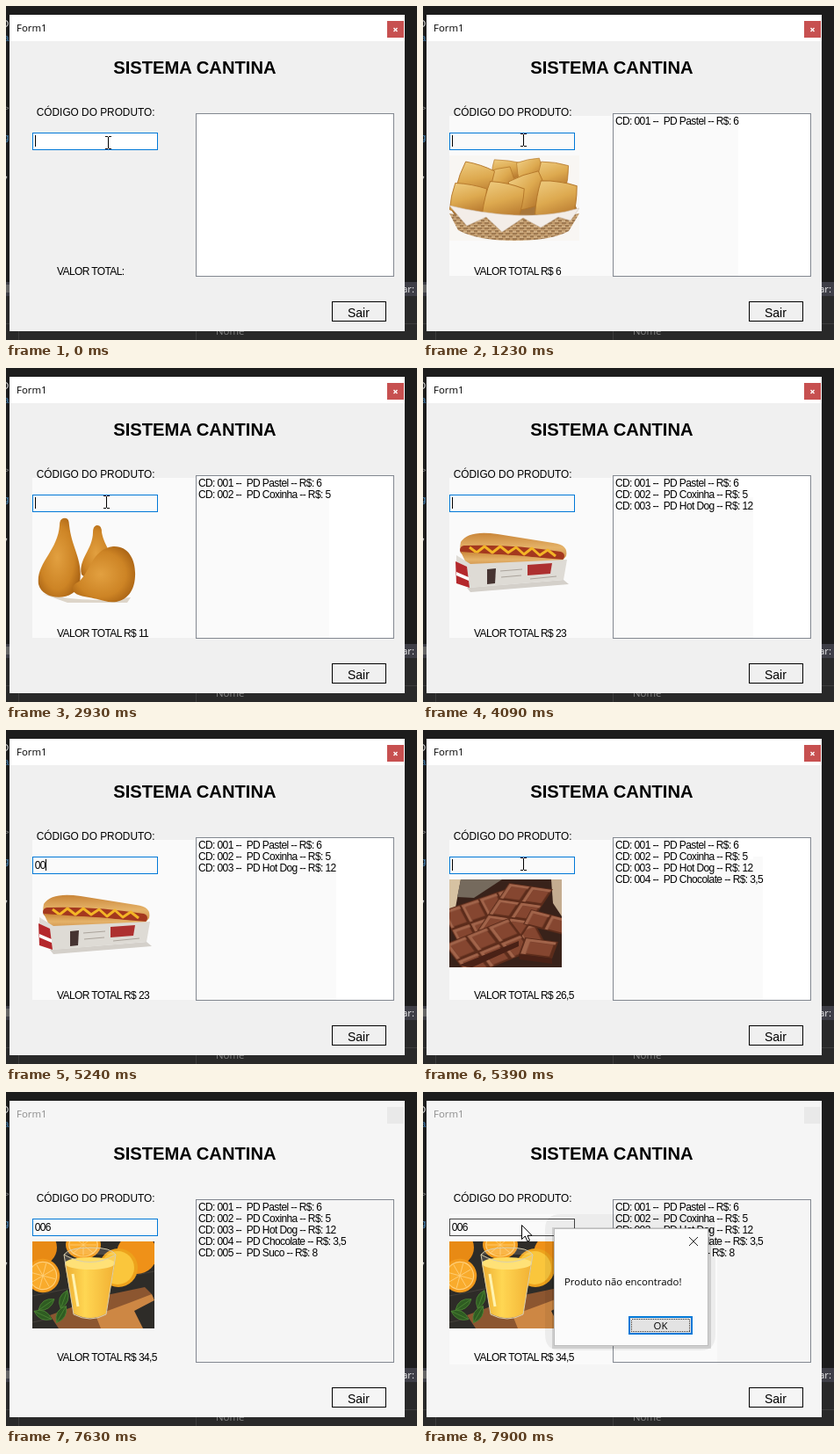
Recreate the animation shown at these times as an HTML page. Size 468 by 380 pixels, loop 8 s.

```html
<!DOCTYPE html>
<html lang="pt">
<head>
<meta charset="utf-8">
<title>Sistema Cantina</title>
<style>
  html, body { margin: 0; width: 100%; height: 100%; overflow: hidden; background: #1c1c1c; }
  #stage { display: block; --face: #f0f0f0; --paper: #fff; --title: #000; --close: #c75050; }
  #stage.inactive { --face: #f5f5f5; --paper: #f5f5f5; --title: #8c8c8c; --close: #e9e9e9; }
  text { white-space: pre; font-family: "Liberation Sans", Arial, sans-serif; }
  .face { fill: var(--face); }
  .paper { fill: var(--paper); }
  .ui { font: 11.4px "Open Sans", "Noto Sans", sans-serif; }
  .small { font-size: 12px; letter-spacing: -.61px; }
  .crisp { shape-rendering: crispEdges; }
  .off { display: none; }
</style>
</head>
<body>
<svg id="stage" width="468" height="380" viewBox="0 0 468 380">
  <defs>
    <linearGradient id="crust" x2=".6" y2="1">
      <stop stop-color="#efcd82"/><stop offset=".55" stop-color="#dda94f"/><stop offset="1" stop-color="#b87a30"/>
    </linearGradient>
    <radialGradient id="fried" cx=".45" cy=".5" r=".62">
      <stop stop-color="#e2a040"/><stop offset=".65" stop-color="#cd8425"/><stop offset="1" stop-color="#a55f12"/>
    </radialGradient>
    <linearGradient id="bread" x2="0" y2="1">
      <stop stop-color="#c98538"/><stop offset=".5" stop-color="#e5b36a"/><stop offset="1" stop-color="#c98a45"/>
    </linearGradient>
    <linearGradient id="juice">
      <stop stop-color="#e9a012"/><stop offset=".4" stop-color="#ffd038"/><stop offset="1" stop-color="#efa414"/>
    </linearGradient>
    <pattern id="wicker" width="8" height="6" patternUnits="userSpaceOnUse">
      <path fill="#bf986a" d="M0 0H8V6H0z"/><path stroke="#7d5a38" d="M0 5H5M4 2H8"/><path stroke="#dfc49c" d="M0 3H4M4 0H8"/>
    </pattern>
    <pattern id="cocoa" width="20" height="20" patternUnits="userSpaceOnUse">
      <path fill="#5c2c1b" d="M0 0H20V20H0z"/><path fill="#a2644a" d="M1 1H19V4H4V19H1z"/><path fill="#854630" d="M4 4H18V18H4z"/>
    </pattern>
    <path id="pillow" fill="url(#crust)" stroke="#b4772a" stroke-width=".8" d="M-17-15Q0-18 16-16Q19 0 17 16Q0 19-17 16Q-19 0-17-15z"/>
    <g id="slice">
      <circle r="16" fill="#f29a1c"/><circle r="13.5" fill="#ffd07a"/><circle r="12.5" fill="#f9ab2c"/>
      <path stroke="#ffcf78" stroke-width=".7" d="M-12 0H12M0-12V12M-8.5-8.5 8.5 8.5M8.5-8.5-8.5 8.5"/>
    </g>
    <path id="leaf" fill="#2f5c22" stroke="#4c8434" stroke-width=".8" d="M-11 0Q0-10 11 0Q0 9-11 0zH11"/>
  </defs>

  <!-- editor behind the window -->
  <path fill="#1c1c1c" d="M0 0H468V380H0z"/>
  <g class="ui">
    <text x="-5" y="24" fill="#ddd">D</text>
    <text x="-3" y="40" fill="#3f7cae">a</text>
    <text x="-3" y="120" fill="#777">&gt;</text>
    <text x="-3" y="153" fill="#4b8fc4">g</text>
    <text x="-1" y="195" fill="#eee">,</text>
  </g>
  <path fill="#292929" d="M0 330H468V380H0z"/>
  <path fill="#3e3e46" d="M0 314H468V330H0z"/>
  <path fill="#666" d="M0 317H4V326H0z"/>
  <path class="crisp" stroke="#3d3d3d" d="M0 361.5H468M14.5 362V380M216.5 362V380"/>
  <text class="ui" x="451" y="326" fill="#eee">ar:</text>
  <text class="ui" x="239" y="374" fill="#858585">Nome</text>

  <!-- window -->
  <path class="face" d="M4 10H454V370H4z"/>
  <path class="paper" d="M4 10H454V40H4z"/>
  <text class="ui" x="12" y="29" fill="var(--title)">Form1</text>
  <path fill="var(--close)" d="M434 17H453V36H434z"/>
  <path id="closeMark" stroke="#fff" stroke-width="1.4" d="M441.5 25 445.5 29M445.5 25 441.5 29"/>
  <path class="paper" d="M216 122H442V308H216z"/>
  <path id="patch" fill="#fafafa"/>
  <path class="crisp" fill="none" stroke="#828790" d="M216.5 122.5H441.5V307.5H216.5z"/>
  <text x="122.2" y="77" font-size="20.2" font-weight="bold">SISTEMA CANTINA</text>
  <text x="34.8" y="125" font-size="11.85">CÓDIGO DO PRODUTO:</text>
  <text id="total" class="small" x="58" y="306"></text>
  <path class="crisp" fill="none" stroke="#000" d="M371.5 336.5H432.5V358.5H371.5z"/>
  <text x="389" y="354" font-size="14">Sair</text>
  <g id="rows"></g>

  <!-- product pictures -->
  <svg class="photo off" x="30" y="170" width="148" height="97">
    <path fill="#f8f6f3" d="M0 0H148V97H0z"/>
    <path fill="#a8763a" d="M2 62Q20 22 74 20Q130 22 146 62L132 80H14z"/>
    <use href="#pillow" transform="translate(66 16) rotate(8) scale(.95 .6)"/>
    <use href="#pillow" transform="translate(92 18) rotate(-10) scale(.8)"/>
    <use href="#pillow" transform="translate(118 24) rotate(10) scale(.95)"/>
    <use href="#pillow" transform="translate(58 30) rotate(-12) scale(.9)"/>
    <use href="#pillow" transform="translate(30 28) rotate(20) scale(1.05)"/>
    <use href="#pillow" transform="translate(22 50) rotate(12) scale(1.1 1)"/>
    <use href="#pillow" transform="translate(90 40) rotate(-18) scale(1.1)"/>
    <use href="#pillow" transform="translate(62 52) rotate(14) scale(1.2)"/>
    <use href="#pillow" transform="translate(122 51) rotate(10) scale(1.25)"/>
    <path fill="url(#wicker)" d="M0 66Q74 80 148 66L136 86Q116 97 74 97Q32 97 10 85z"/>
    <path fill="#f3ede8" stroke="#d5c8bd" stroke-width=".6" d="M0 57Q36 66 74 68Q116 70 148 60L138 74 124 70 104 82 84 71 60 87 42 70 20 80z"/>
  </svg>
  <svg class="photo off" x="30" y="170" width="118" height="97">
    <path fill="#fafafa" d="M0 0H118V97H0z"/>
    <path fill="#ddd5c9" d="M12 87Q60 98 112 91L108 97H40z"/>
    <g fill="url(#fried)">
      <path d="M73 9Q79 8 79 17C82 34 94 42 93 62Q75 82 56 65C52 48 69 36 69 17Q69 10 73 9z"/>
      <path d="M35 1Q42-1 42 9C45 36 58 48 54 74C50 96 12 96 7 76C4 52 29 38 31 9Q31 2 35 1z"/>
      <path d="M46 82Q45 77 53 73C66 62 68 36 92 33C110 32 118 49 117 67C116 91 99 100 82 95C67 90 48 91 46 82z"/>
    </g>
  </svg>
  <svg class="photo off" x="30" y="170" width="140" height="90">
    <path fill="#d4d0ca" d="M20 80 130 71 136 76 24 85z"/>
    <path fill="url(#bread)" d="M13 28Q22 14 55 19L118 29Q136 31 133 44L127 51 18 46Q10 38 13 28z"/>
    <path fill="none" stroke="#a4381e" stroke-width="10" stroke-linecap="round" d="M17 37Q70 35 126 44"/>
    <path fill="none" stroke="#f3b526" stroke-width="3" stroke-linejoin="round" d="M23 34 31 40 40 33 49 40 58 33 67 40 76 34 85 42 94 35 103 43 112 37 121 44"/>
    <path fill="url(#bread)" d="M13 39Q70 43 130 48L126 57 20 54z"/>
    <path fill="#dedbd5" d="M8 43 24 53 134 48 130 71 23 80 8 74z"/>
    <path fill="#b4282c" d="M7 50 20 56 23 80 8 75z"/>
    <path fill="#fff" d="M8 62 22 68V72L8 66z"/>
    <path fill="#463432" d="M43 59 53 58 52 75 43 76z"/>
    <path fill="#ad3030" d="M89 54 117 52 115 64 89 66z"/>
    <path fill="none" stroke="#aaa39b" d="M58 61 83 59M59 68 82 66M92 70 122 67"/>
  </svg>
  <svg class="photo off" x="30" y="170" width="128" height="100">
    <path fill="#39221a" d="M0 0H128V100H0z"/>
    <path fill="#d6c2a2" d="M0 0H13L7 32 0 36z"/>
    <path fill="#756a5d" d="M13 0H60L28 21 9 20z"/>
    <path fill="#c4ac90" d="M116 0H128V42L118 27z"/>
    <g fill="url(#cocoa)">
      <path transform="matrix(1.05 -.36 .55 1.05 -9 36)" d="M0 0H80V60H0z"/>
      <path transform="matrix(1.25 .18 -.6 .9 68 4)" d="M0 0H40V60H0z"/>
      <path transform="matrix(1.22 -.5 .7 .92 -6 74)" d="M0 0H60V40H0z"/>
      <path transform="matrix(1.15 .3 -.45 .85 93 34)" d="M0 0H40V20H0z"/>
      <path transform="matrix(1.9 .25 -.35 .95 86 66)" d="M0 0H20V20H0z"/>
    </g>
    <path fill="#4a2116" d="M79 85 117 90V96L80 91zM10 98 79 70V76L26 100z"/>
  </svg>
  <svg class="photo off" x="30" y="170" width="139" height="99">
    <path fill="#2e2c28" d="M0 0H139V99H0z"/>
    <path stroke="#45403a" d="M0 62 139 34M0 92 139 64"/>
    <circle cx="8" cy="7" r="20" fill="#e88a14"/>
    <use href="#slice" transform="translate(58 4) scale(1.25 1)"/>
    <circle cx="119" cy="14" r="23" fill="#ef9118"/>
    <use href="#slice" transform="translate(12 39) rotate(15) scale(1.2)"/>
    <path fill="#8c5630" d="M20 84 80 62 128 52 136 60 114 76 124 99H30z"/>
    <path fill="#cd8744" d="M72 84 110 70 136 60 139 67 116 79 126 99H78z"/>
    <circle cx="98" cy="30" r="22" fill="#eda21c"/>
    <circle cx="97" cy="30" r="19" fill="#fac63c"/>
    <path fill="url(#juice)" d="M37 26Q66 34 94 25L84 82Q66 92 47 82z"/>
    <ellipse cx="65.5" cy="25" rx="28.5" ry="7" fill="#ffdc62"/>
    <path fill="#ffffff22" stroke="#d9cfae" d="M36 15Q66 32 95 15L84 83Q66 93 47 83zQ42 7 66 7T95 15"/>
    <path stroke="#fff3b0" stroke-width="3" d="M46 37 52 74"/>
    <use href="#leaf" transform="translate(36 66) rotate(-70)"/>
    <use href="#leaf" transform="translate(16 72) rotate(-35)"/>
    <use href="#leaf" transform="translate(12 84) rotate(25)"/>
    <use href="#leaf" transform="translate(33 83) rotate(-60)"/>
  </svg>

  <!-- code field -->
  <path id="field" class="crisp" stroke="#0078d7" d="M30.5 144.5H172.5V163.5H30.5z"/>
  <text id="code" class="small" x="32.7" y="158"></text>
  <path id="caret" class="crisp" d="M0 147H1V160H0z"/>
  <path id="beam" class="crisp" fill="none" stroke="#000" d="M-3 .5H0M1 .5H4M.5 1V14M-3 14.5H0M1 14.5H4"/>

  <!-- message box -->
  <g id="dialog" class="off">
    <path id="shadow" fill="#000" opacity=".055" d="M157 139H316Q333 139 333 156V276Q333 294 316 294H157Q139 294 139 276V156Q139 139 157 139z"/>
    <g id="box">
      <path fill="#000" opacity=".13" d="M147 154H328V292H147z"/>
      <path class="crisp" fill="#fbfbfb" stroke="#bdbdbd" d="M149.5 155.5H324.5V288.5H149.5z"/>
      <path stroke="#222" d="M303 165 313 175M313 165 303 175"/>
      <text class="ui" x="161" y="220">Produto não encontrado!</text>
      <path class="crisp" fill="#e3e3e3" stroke="#0078d7" stroke-width="2" d="M235 256H306V275H235z"/>
      <path class="crisp" fill="none" stroke="#333" stroke-dasharray="1 1" d="M237.5 258.5H303.5V272.5H237.5z"/>
      <text class="ui" x="270.5" y="270" text-anchor="middle">OK</text>
    </g>
  </g>
  <path id="arrow" class="off" fill="#fff" stroke="#000" d="M112.5 151.5V167.5L116.3 164 119 170 121.5 169 119 163.3H124z"/>
</svg>
<script>
const LOOP = 8000;
const $ = id => document.getElementById(id);
const show = (el, on) => el.classList.toggle('off', !on);

const products = [
  ['Pastel', '6', '6'], ['Coxinha', '5', '11'], ['Hot Dog', '12', '23'],
  ['Chocolate', '3,5', '26,5'], ['Suco', '8', '34,5']
];
// areas repainted in a slightly different white after each purchase
const patches = ['M30 125H359V307H30z', 'M359 138H368V307H359z', 'M368 147H376V307H368z', 'M376 144H387V307H376z', ''];

const REST = '114 145';
const type = (code, more) => ({ code, caret: 1, ...more });
const first = type('0', { beam: '' });
const buy = (count, beam) => ({ code: '', caret: 1, count, beam });
const hide = { caret: 0 };

const events = [
  [0, { code: '', caret: 1, beam: '116 148', count: 0, dialog: 0, inactive: 0 }],
  [120, { beam: REST }],
  [810, first], [960, type('00')], [1080, type('001')], [1230, buy(1, REST)],
  [1690, hide], [2250, { caret: 1 }],
  [2660, first], [2810, type('00')], [2930, buy(2, REST)], [3390, hide],
  [3790, first], [3940, type('00')], [4090, buy(3, '')], [4660, hide],
  [5090, first], [5240, type('00')], [5390, buy(4, REST)], [5920, hide],
  [6070, first], [6220, type('00')], [6340, buy(5, '')], [6920, hide],
  [7200, first], [7480, type('00')],
  [7630, { code: '006', caret: 0, inactive: 1 }],
  [7780, { dialog: 1 }], [7900, { dialog: 2 }]
];

const rows = products.map(([name, price], i) => {
  const row = document.createElementNS('http://www.w3.org/2000/svg', 'text');
  row.setAttribute('class', 'small');
  row.setAttribute('x', 219);
  row.setAttribute('y', 135 + 13 * i);
  row.textContent = `CD: 00${i + 1} --  PD ${name} -- R$: ${price}`;
  $('rows').append(row);
  return row;
});
const photos = document.querySelectorAll('.photo');

function render({ code, caret, beam, count, dialog, inactive }) {
  $('stage').classList.toggle('inactive', !!inactive);
  show($('closeMark'), !inactive);
  $('code').textContent = code;
  show($('caret'), caret);
  $('caret').setAttribute('transform', `translate(${33 + 6 * code.length} 0)`);
  show($('beam'), beam);
  if (beam) $('beam').setAttribute('transform', `translate(${beam})`);
  rows.forEach((row, i) => show(row, i < count));
  photos.forEach((photo, i) => show(photo, i === count - 1));
  $('total').textContent = 'VALOR TOTAL' + (count ? ' R$ ' + products[count - 1][2] : ':');
  $('patch').setAttribute('d', dialog ? 'M30 139H335V310H30z' : inactive ? '' : patches.slice(0, count).join(''));
  $('field').setAttribute('stroke', dialog ? '#444' : '#0078d7');
  $('field').setAttribute('fill', count ? '#fafafa' : '#fff');
  show($('dialog'), dialog);
  show($('arrow'), dialog);
  show($('shadow'), dialog === 2);
  $('box').setAttribute('opacity', dialog === 2 ? 1 : .8);
}

let start, shown = -1;
function tick(now) {
  start ??= now;
  const t = (now - start) % LOOP;
  const past = events.filter(([at]) => at <= t);
  if (past.length !== shown) {
    shown = past.length;
    render(Object.assign({}, ...past.map(([, change]) => change)));
  }
  requestAnimationFrame(tick);
}
requestAnimationFrame(tick);
</script>
</body>
</html>
```
